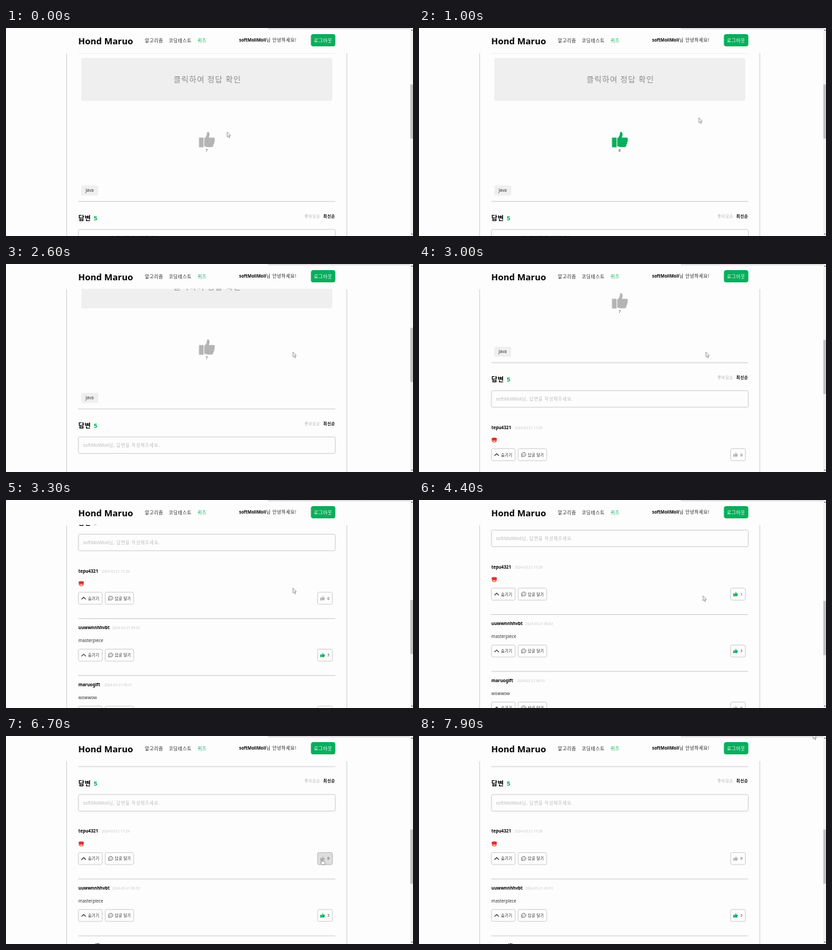
Write an HTML page that moves like this. It is 600 px wide and 306 px high and loops after 8 s.

```html
<!DOCTYPE html>
<html lang="ko">
<head>
<meta charset="utf-8">
<title>Quiz answers</title>
<style>
@property --scroll { syntax: "<number>"; inherits: true; initial-value: 0; }
@property --liked { syntax: "<number>"; inherits: true; initial-value: 0; }
@property --icon { syntax: "<number>"; inherits: true; initial-value: 0; }
@property --count { syntax: "<number>"; inherits: true; initial-value: 0; }
@property --over-post { syntax: "<number>"; inherits: true; initial-value: 0; }
@property --over-reply { syntax: "<number>"; inherits: true; initial-value: 0; }

html, body { margin: 0; width: 100%; height: 100%; overflow: hidden; background: #fdfdfd; }
svg {
  display: block; width: 600px; height: 306px;
  font-family: "Noto Sans", "Noto Sans CJK KR", "Noto Sans CJK", sans-serif;
  animation: scroll 8s -8ms infinite step-end, liked 8s -8ms infinite step-end,
    icon 8s -8ms infinite step-end, count 8s -8ms infinite step-end,
    over-post 8s -8ms infinite step-end, over-reply 8s -8ms infinite step-end;
}
.page { transform: translateY(calc(var(--scroll) * -1px)); }
.bar { transform: translateY(calc(var(--scroll) * .26px)); }
.cursor { animation: move 8s -8ms infinite step-end; stroke: #777; stroke-width: .7; fill: #fff; }
.arrow { opacity: calc(1 - var(--over-post) - var(--over-reply)); }
.hand { opacity: calc(var(--over-post) + var(--over-reply)); }
.liked { opacity: var(--liked); }
.unliked { opacity: calc(1 - var(--liked)); }
.icon-on { opacity: var(--icon); }
.icon-off { opacity: calc(1 - var(--icon)); }
.count-on { opacity: var(--count); }
.count-off { opacity: calc(1 - var(--count)); }
.over-post { opacity: var(--over-post); }
.over-reply { opacity: var(--over-reply); }

.logo { font: bold 13px "Noto Sans", sans-serif; }
.nav { font-size: 6.8px; letter-spacing: .5px; fill: #222; }
.b { font-weight: bold; }
.green { fill: #08ae5c; }
.grey { fill: #b4b4b4; }
.mid { text-anchor: middle; }
.reveal { font-size: 11.5px; font-weight: 500; letter-spacing: .9px; fill: #8c8c8c; }
.title { font-size: 9.6px; font-weight: bold; letter-spacing: .3px; }
.sort { font-size: 5.9px; letter-spacing: .45px; }
.hint { font-size: 6.5px; fill: #bcbcbc; }
.hint tspan { letter-spacing: .65px; }
.num { font-size: 5.2px; fill: #333; text-anchor: middle; }
.name { font-size: 6.3px; font-weight: bold; }
.date { font-size: 5.1px; fill: #c6c6c6; }
.body { font-size: 6.3px; fill: #333; }
.label { font-size: 5.6px; letter-spacing: .35px; fill: #222; }
.box { fill: #fdfdfd; stroke: #cbcbcb; stroke-width: .9; }
.rule { stroke: #c8c8c8; stroke-width: .9; }
.line { fill: none; stroke: #333; stroke-width: .8; }

@keyframes scroll {
  0% { --scroll: 0; }
  15% { --scroll: 0; animation-timing-function: steps(3); }
  18.75% { --scroll: 42; }
  32.5% { --scroll: 42; animation-timing-function: steps(2); }
  35% { --scroll: 75; }
  37.5% { --scroll: 110; }
  40% { --scroll: 190; }
  41.25% { --scroll: 246; }
  42.5% { --scroll: 252; }
  62.5% { --scroll: 245; }
  63.75% { --scroll: 225; }
  65% { --scroll: 211.5; }
  66.25%, 99.99% { --scroll: 210.2; }
  100% { --scroll: 0; }
}
@keyframes move {
  0% { transform: translate(326px, 153px); animation-timing-function: steps(3); }
  3.75% { transform: translate(297px, 165px); }
  7.5% { transform: translate(297px, 165px); animation-timing-function: steps(4); }
  12.5% { transform: translate(412.5px, 132px); }
  18.75% { transform: translate(412.5px, 132px); animation-timing-function: steps(3); }
  22.5% { transform: translate(297px, 123px); }
  26.25% { transform: translate(297px, 123px); animation-timing-function: steps(4); }
  31.25% { transform: translate(423px, 129.5px); }
  41.25% { transform: translate(423px, 129.5px); animation-timing-function: steps(6); }
  48.75% { transform: translate(466px, 138px); }
  52.5% { transform: translate(466px, 138px); animation-timing-function: steps(6); }
  60% { transform: translate(324px, 147px); }
  61.25% { transform: translate(324px, 147px); animation-timing-function: steps(3); }
  65% { transform: translate(435.5px, 110px); animation-timing-function: steps(6); }
  72.5% { transform: translate(588px, 0); }
  73.75% { transform: translate(588px, 0); animation-timing-function: steps(5); }
  80% { transform: translate(466px, 181px); }
  85% { transform: translate(466px, 181px); animation-timing-function: steps(6); }
  92.5% { transform: translate(589px, 12px); animation-timing-function: steps(3); }
  96.25%, 100% { transform: translate(581px, -3px); }
}
@keyframes liked { 0%, 25% { --liked: 0; } 5% { --liked: 1; } 100% { --liked: 0; } }
@keyframes icon { 0%, 82.5%, 100% { --icon: 0; } 50% { --icon: 1; } }
@keyframes count { 0%, 82.5%, 100% { --count: 0; } 51.25% { --count: 1; } }
@keyframes over-post {
  0%, 8.75%, 27.5%, 100% { --over-post: 0; }
  2.5%, 21.25% { --over-post: 1; }
}
@keyframes over-reply {
  0%, 53.75%, 86.25%, 100% { --over-reply: 0; }
  47.5%, 80% { --over-reply: 1; }
}
</style>
</head>
<body>
<svg viewBox="0 0 600 306">
  <defs>
    <path id="thumb" d="M0 9h6.8v14.3H0zM7.8 10.3C11 8 11.6 5 12 1.5c.2-1.9 3.6-1.4 3.6 2.6 0 1.9-.5 3.4-1.2 4.9h7.1c2.2 0 2.6 2.6 1.2 3.6 1 1 .7 2.8-.5 3.4.6 1.2.1 2.6-1 3 .4 1.8-.4 3.9-2.5 3.9h-5.500c-2.200 0-3.800-.6-5.400-1.400z"/>
    <use id="mini" href="#thumb" transform="translate(463.300 387) scale(.285)"/>
    <g id="actions">
      <rect class="box" x="106.800" y="381.700" width="35" height="17.600" rx="2"/>
      <path class="line" d="M111.300 392.200l3.200-3.200 3.200 3.200" style="stroke-width:1.100"/>
      <text class="label" x="121" y="392.500">숨기기</text>
      <rect class="box" x="146.200" y="381.700" width="42" height="17.600" rx="2"/>
      <path class="line" d="M151.200 393.300l.4-1.600a3.200 2.800 0 1 1 1.400 1.100z" style="stroke-width:.7"/>
      <path class="line" d="M152.400 390.300h3.600" stroke-dasharray=".7 .7"/>
      <text class="label" x="160.500" y="392.500">답글 달기</text>
      <rect class="box" x="459.400" y="381.700" width="21.800" height="17.600" rx="2"/>
    </g>
    <path id="rule" class="rule" d="M106.500 420.500h379"/>
  </defs>

  <rect width="600" height="306" fill="#fdfdfd"/>
  <path d="M89.500 37v269M502.500 37v269" stroke="#d2d2d2"/>

  <g class="page">
    <path d="M107 37.300h379" stroke="#e9e9e9" stroke-width=".8"/>
    <rect x="111" y="44" width="370" height="63.300" rx="3" fill="#efefef"/>
    <text class="reveal" x="247" y="80.300">클릭하여 정답 확인</text>

    <rect class="over-post" x="280" y="149" width="32" height="40" rx="2" fill="#e4e4e4"/>
    <g transform="translate(284.500 152.300)">
      <use href="#thumb" class="grey unliked"/>
      <use href="#thumb" class="green liked"/>
    </g>
    <text class="num unliked" x="295.800" y="182.400">7</text>
    <text class="num liked" x="295.800" y="182.400">8</text>

    <rect x="111" y="231.500" width="25" height="15" rx="2" fill="#efefef"/>
    <text class="body mid" x="123.300" y="241.300">Java</text>
    <path class="rule" d="M106.500 255.200h379"/>

    <text class="title" x="106.800" y="282.800">답변</text>
    <text class="title green" x="129.300" y="282.800">5</text>
    <text class="sort grey" x="440" y="278.600">좋아요순</text>
    <text class="sort b" x="467.800" y="278.600">최신순</text>

    <rect class="box" x="106.800" y="296.300" width="378.600" height="24.400" rx="2"/>
    <text class="hint" x="113.500" y="310.900">softMoliMoli<tspan>님, 답변을 작성해주세요.</tspan></text>

    <g>
      <text class="name" x="106.800" y="352.700">tepu4321</text>
      <text class="date" x="141" y="352.500">2024-03-21 17:29</text>
      <circle cx="111" cy="369" r="3.700" fill="#ea5a3c"/>
      <path d="M107 366.300q2-1.500 3.900.5 2-2 4-.5 0 2.200-2.400 3.200l-1.600-1.500-1.600 1.500q-2.200-1-2.300-3.200z" fill="#dc2338"/>
      <path d="M109.200 370.300h3.600q-.5 1.600-1.800 1.600t-1.800-1.600z" fill="#fbe3da"/>
      <use href="#actions"/>
      <rect class="over-reply" x="459.400" y="381.700" width="21.800" height="17.600" rx="2" fill="#dedede" stroke="#bbb" stroke-width=".9"/>
      <use href="#mini" class="grey icon-off"/>
      <use href="#mini" class="green icon-on"/>
      <text class="num count-off" x="475.200" y="392.500">0</text>
      <text class="num count-on" x="475.200" y="392.500">1</text>
      <use href="#rule"/>
    </g>
    <g transform="translate(0 83.700)">
      <text class="name" x="106.800" y="352.700">uuwwnnhhvbt</text>
      <text class="date" x="156.500" y="352.500">2024-03-21 09:33</text>
      <text class="body" x="106.800" y="371.200">masterpiece</text>
      <use href="#actions"/>
      <use href="#mini" class="green"/>
      <text class="num" x="475.200" y="392.500">3</text>
      <use href="#rule"/>
    </g>
    <g transform="translate(0 167.500)">
      <text class="name" x="106.800" y="352.700">maruogift</text>
      <text class="date" x="145" y="352.500">2024-03-21 09:31</text>
      <text class="body" x="106.800" y="371.200">wowwow</text>
      <use href="#actions"/>
      <use href="#mini" class="grey"/>
      <text class="num" x="475.200" y="392.500">0</text>
    </g>
  </g>

  <rect width="600" height="36.500" fill="#fdfdfd"/>
  <text class="logo" x="106.500" y="23.800">Hond Maruo</text>
  <g class="nav">
    <text x="204.800" y="20.500">알고리즘</text>
    <text x="240" y="20.500">코딩테스트</text>
    <text class="green" x="282.300" y="20.500">퀴즈</text>
    <text x="383.800" y="20.300" style="font-size:6.700px">님 안녕하세요!</text>
    <rect class="green" x="449.500" y="9" width="36" height="18" rx="3.500"/>
    <text x="454" y="20.600" style="fill:#fff">로그아웃</text>
  </g>
  <text class="name" x="343.800" y="20.300">softMoliMoli</text>

  <linearGradient id="shade" x2="0" y2="1">
    <stop stop-color="#d4d4d4"/>
    <stop offset="1" stop-color="#fdfdfd"/>
  </linearGradient>
  <rect x="386" width="214" height="3" fill="url(#shade)"/>

  <rect x="596" width="4" height="306" fill="#f1f1f1"/>
  <path d="M597 4l1.300-2 1.300 2zM597 302.500l1.300 2 1.300-2z" fill="#666"/>
  <rect class="bar" x="596" y="83" width="4" height="79.700" fill="#c1c1c1"/>

  <g class="cursor">
    <path class="arrow" d="M0 0v7.200l1.600-1.500 1.300 2.800 1.100-.5-1.200-2.700h2.300z"/>
    <path class="hand" d="M-.8.7c0-1 1.500-1 1.500 0v2.600l2.600.6c.8.2 1 .7.9 1.400l-.6 3.200H-.2L-2.400 5.300c-.4-.7.4-1.200 1-.7l.6.600z"/>
  </g>
</svg>
</body>
</html>
```
